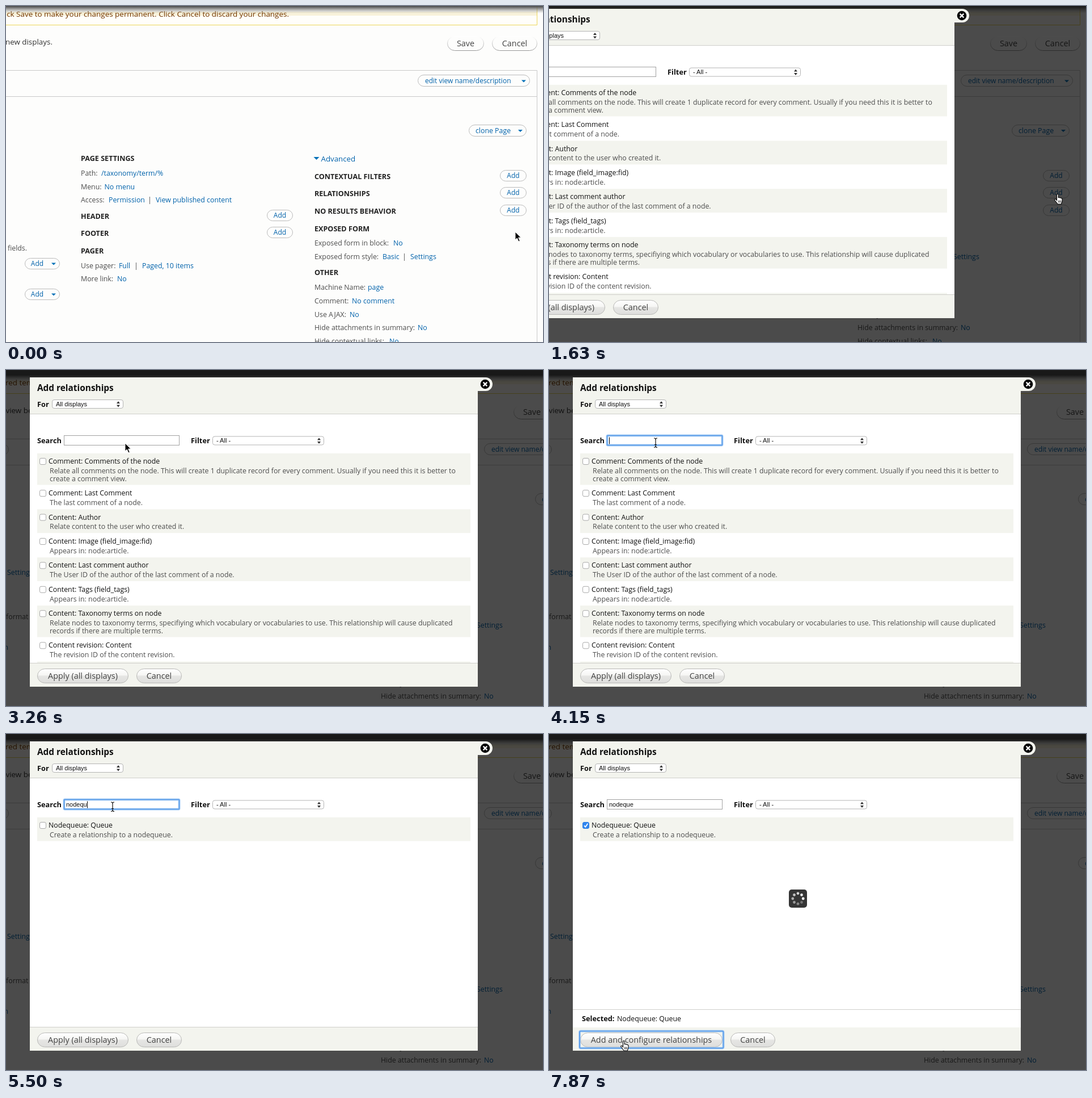
Recreate the animation shown at these times as an HTML page. Size 947x592 px, loop 8 s.

```html
<!DOCTYPE html>
<html lang="en">
<head>
<meta charset="utf-8">
<title>Adding a relationship</title>
<style>
  html, body { margin: 0; width: 100%; height: 100%; overflow: hidden; background: #fdfdfc; }
  svg { display: block; }
  text { font: 12.35px "Open Sans", "Noto Sans", sans-serif; fill: #4d4d4d; }
  .link { fill: #0062ab; }
  .head { font-size: 12.6px; font-weight: 700; fill: #222; }
  .label { font-size: 12.8px; font-weight: 700; fill: #111; }
  .title { font-size: 15.4px; font-weight: 700; fill: #111; }
  .dark { fill: #111; }
  .note { font-size: 13.4px; fill: #333; }
  .warn { font-size: 13.45px; fill: #733600; }
  .small { font-size: 12px; fill: #0062ab; }
  .big { font-size: 14.4px; fill: #444; }
  .form { font: 11px "Liberation Sans", Arial, sans-serif; fill: #111; }
  .mid { text-anchor: middle; }
  .end { text-anchor: end; }
</style>
</head>
<body>
<svg id="stage" width="947" height="592" viewBox="0 0 947 592">
  <defs>
    <linearGradient id="shade" x2="0" y2="1">
      <stop offset="0" stop-color="#444"/><stop offset=".25" stop-color="#666" stop-opacity=".85"/>
      <stop offset="1" stop-color="#999" stop-opacity="0"/>
    </linearGradient>
    <linearGradient id="edge" x2="0" y2="1">
      <stop offset="0" stop-color="#fff"/><stop offset=".5" stop-color="#ccc"/><stop offset="1" stop-color="#999"/>
    </linearGradient>
    <linearGradient id="button" x2="0" y2="1">
      <stop offset="0" stop-color="#fff"/><stop offset=".45" stop-color="#f6f6f4"/>
      <stop offset=".5" stop-color="#e6e6e4"/><stop offset="1" stop-color="#dededc"/>
    </linearGradient>
    <clipPath id="listClip"><rect id="listArea" x="42" y="78" width="790" height="438"/></clipPath>
  </defs>
  <g id="scene">
    <g id="page"></g>
    <rect id="dim" x="-400" y="-40" width="1500" height="680" opacity=".7"/>
    <g id="dialog" transform="translate(-117 -8)">
      <g id="frame"></g>
      <g id="list" clip-path="url(#listClip)"></g>
      <g id="selected"></g>
      <g id="buttons"></g>
      <g id="selectRing"></g>
      <g id="searchRing"></g>
      <text id="query" class="form" x="106" y="128.4"></text>
      <path id="caret" stroke="#000"/>
    </g>
    <g id="spinner"></g>
  </g>
  <g id="recorder"></g>
  <g id="cursor"></g>
</svg>
<script>
const $ = id => document.getElementById(id);
const SIZE = { title: 15.4, big: 14.4, note: 13.4, warn: 13.45, form: 11 };

// y is the middle of the capitals
const text = (x, y, str, cls = '') =>
  `<text x="${x}" y="${y + (SIZE[cls.split(' ')[0]] || 12.4) * .34}" class="${cls}">${str}</text>`;
const rect = (x, y, w, h, fill, more = '') =>
  `<rect x="${x}" y="${y}" width="${w}" height="${h}" fill="${fill}" ${more}/>`;
const line = (d, color) => `<path d="${d}" fill="none" stroke="${color}"/>`;
const arrowDown = (x, y, s = 4) => `<path d="M${x - s} ${y - s / 2}h${2 * s}l${-s} ${s}z" fill="#0071b8"/>`;
const pill = (x, y, w, h, stroke = '#bbb', fill = 'none') =>
  rect(x + .5, y + .5, w - 1, h - 1, fill, `rx="${h / 2}" stroke="${stroke}"`);
const add = (x, y, w = 47) => pill(x, y, w, 20) + text(x + w / 2, y + 10, 'Add', 'small mid');
const dropAdd = y => pill(33, y, 62, 20) + text(55, y + 10, 'Add', 'small mid') + arrowDown(84, y + 10.5);
const bigButton = (x, y, w, label, fill = 'url(#button)', stroke = '#b9b9b7') =>
  pill(x, y, w, 26, stroke, fill) + text(x + w / 2, y + 13, label, 'big mid');
const select = (x, y, w, label) =>
  rect(x + .5, y + .5, w - 1, 15, '#fff', 'rx="3.5" stroke="#b4b4b4"') + text(x + 7, y + 8, label, 'form') +
  `<path d="M${x + w - 12} ${y + 7}l3-4 3 4zm0 2.5l3 4 3-4z" fill="#333"/>`;
const ring = (x, y, w, h, r) =>
  rect(x, y, w, h, 'none', `rx="${r}" stroke="#9cc7f8" stroke-width="4" opacity=".75"`) +
  rect(x, y, w, h, 'none', `rx="${r}" stroke="#5f9fe8" stroke-width="2"`);

// Rows of label and link pairs: y, then x and text by turns
const SETTINGS = [
  [295, 132, 'Path:', 168, '/taxonomy/term/%'],
  [318.5, 132, 'Menu:', 173.5, 'No menu'],
  [342, 132, 'Access:', 181, 'Permission', 250, '|', 264, 'View published content'],
  [457.5, 132, 'Use pager:', 199, 'Full', 226, '|', 240, 'Paged, 10 items'],
  [481, 132, 'More link:', 196, 'No'],
  [418, 544, 'Exposed form in block:', 683, 'No'],
  [441.5, 544, 'Exposed form style:', 664, 'Basic', 699, '|', 713, 'Settings'],
  [496, 544, 'Machine Name:', 638, 'page'],
  [519.5, 544, 'Comment:', 610, 'No comment'],
  [543.5, 544, 'Use AJAX:', 606, 'No'],
  [567, 544, 'Hide attachments in summary:', 726, 'No'],
  [590.5, 544, 'Hide contextual links:', 676, 'No'],
];
const HEADS = [
  [132, 269, 'PAGE SETTINGS'], [132, 371, 'HEADER'], [132, 401, 'FOOTER'], [132, 432, 'PAGER'],
  [544, 300.5, 'CONTEXTUAL FILTERS'], [544, 331, 'RELATIONSHIPS'], [544, 362, 'NO RESULTS BEHAVIOR'],
  [544, 392.5, 'EXPOSED FORM'], [544, 470, 'OTHER'],
];

function settingsRow([y, ...cells]) {
  let out = '';
  for (let i = 0; i < cells.length; i += 2) {
    out += text(cells[i], y, cells[i + 1], i && cells[i + 1] !== '|' ? 'link' : '');
  }
  return out;
}

$('page').innerHTML =
  rect(-400, -40, 1500, 680, '#fdfdfc') +
  rect(-400, 0, 1337, 33, '#fffefa') + rect(-400, 10, 1337, 7, '#f8f2da') +
  line('M-400 33.5H936.5V0', '#edd65a') +
  text(499, 14.5, 'All changes are stored temporarily. Click Save to make your changes permanent. Click Cancel to discard your changes.', 'warn end') +
  rect(-400, -40, 1500, 40, '#555') + rect(-400, 0, 1500, 13, 'url(#shade)') +
  text(82, 63, 'Modify the display(s) of your view below or add new displays.', 'note end') +
  bigButton(778, 53, 65, 'Save', 'none', 'url(#edge)') +
  bigButton(857, 53, 80, 'Cancel', 'none', 'url(#edge)') +
  line('M-400 113.5H936.5V640M-400 159.5H936', '#c9c9c9') +
  pill(726, 121, 198, 21) + text(739, 132, 'edit view name/description', 'small') + arrowDown(913, 132.5) +
  pill(816, 209, 102, 21) + text(859, 219.5, 'clone Page', 'link mid') + arrowDown(907, 220) +
  pill(-160, 122, 48, 20) + text(-115, 349, 'Settings', 'link') + text(-113, 481, 'Description', 'link end') +
  text(37, 427, 'The selected style or row format does not use fields.', 'end') +
  dropAdd(444) + dropAdd(498) +
  arrowDown(547.5, 268.5, 5) +
  `<text x="555.5" y="274" class="link" style="font-size:13.3px">Advanced</text>` +
  HEADS.map(([x, y, s]) => text(x, y, s, 'head')).join('') +
  SETTINGS.map(settingsRow).join('') +
  add(460, 359, 46) + add(460, 389, 46) + add(871, 289) + add(871, 350) +
  add(871, 319) + `<g id="hover">${pill(871, 319, 47, 20, '#888')}</g>`;

$('frame').innerHTML =
  `<path d="M832 13h14a12 12 0 0 1 0 24h-14z" fill="#f3f4ee"/>` +
  `<circle cx="845" cy="25" r="8.3"/><path d="M841.7 21.7l6.6 6.6m0-6.6l-6.6 6.6" stroke="#fff" stroke-width="2.4"/>` +
  rect(42, 13, 790, 545, '#fff') + rect(42, 13, 790, 64, '#f3f4ee') + rect(42, 517, 790, 41, '#f3f4ee') +
  line('M42 77.5H832M42 516.5H832', '#cfcfcb') +
  text(55, 32, 'Add relationships', 'title') +
  text(55, 60.5, 'For', 'label') + select(81, 52, 126, 'All displays') +
  text(55, 124.5, 'Search', 'label') + rect(102.5, 115.5, 203, 17, '#fff', 'stroke="#a2a2a2"') +
  text(326, 124.5, 'Filter', 'label') + select(364, 116.5, 197, '- All -');

$('selected').innerHTML = rect(42, 485, 790, 32, '#fff') + line('M42 485.5H832', '#cfcfcb') +
  text(58, 502, 'Selected:', 'label') + text(120, 502, 'Nodequeue: Queue', 'dark');
$('selectRing').innerHTML = ring(81, 52, 126, 16, 4);
$('searchRing').innerHTML = ring(102.5, 115.5, 203, 17, 1);

const ITEMS = [
  ['Comment: Comments of the node', 'Relate all comments on the node. This will create 1 duplicate record for every comment. Usually if you need this it is better to', 'create a comment view.'],
  ['Comment: Last Comment', 'The last comment of a node.'],
  ['Content: Author', 'Relate content to the user who created it.'],
  ['Content: Image (field_image:fid)', 'Appears in: node:article.'],
  ['Content: Last comment author', 'The User ID of the author of the last comment of a node.'],
  ['Content: Tags (field_tags)', 'Appears in: node:article.'],
  ['Content: Taxonomy terms on node', 'Relate nodes to taxonomy terms, specifiying which vocabulary or vocabularies to use. This relationship will cause duplicated', 'records if there are multiple terms.'],
  ['Content revision: Content', 'The revision ID of the content revision.'],
  ['Content revision: User', 'Relate a node revision to the user who created the revision.'],
  ['Nodequeue: Queue', 'Create a relationship to a nodequeue.'],
];

function listMarkup(query, checked) {
  let y = 146.8;
  return ITEMS.filter(item => item.join(' ').toLowerCase().includes(query)).map((item, i) => {
    const [name, ...about] = item, top = y, h = about.length > 1 ? 56.2 : 42.4;
    y += h;
    return (i % 2 ? '' : rect(55, top, 764, h - .6, '#f3f4ee')) +
      rect(59.5, top + 8.7, 11, 11, checked ? '#2f86f0' : '#fff', `rx="2.5" stroke="${checked ? '#2f7fe0' : '#aaa'}"`) +
      (checked ? `<path d="M62 ${top + 14.5}l2.3 2.5 4-6" fill="none" stroke="#fff" stroke-width="1.7"/>` : '') +
      text(75, top + 14, name, 'dark') + about.map((s, k) => text(77, top + 30.7 + 14 * k, s)).join('');
  }).join('');
}

const buttonsMarkup = pressed => pressed
  ? bigButton(55, 526, 251, 'Add and configure relationships') + bigButton(320, 526, 79, 'Cancel') + ring(54, 523.5, 253.5, 30, 2)
  : bigButton(55, 526, 161, 'Apply (all displays)') + bigButton(230, 526, 80, 'Cancel');

function spinnerMarkup(phase) {
  let out = rect(306, 266, 32, 32, '#353535', 'rx="5"');
  for (let i = 0; i < 8; i++) {
    const a = i * Math.PI / 4, age = (phase - i + 16) % 8;
    out += `<circle cx="${322 + 9.2 * Math.cos(a)}" cy="${282 + 9.2 * Math.sin(a)}" r="2.4" fill="#fff" opacity="${1 - age * .1}"/>`;
  }
  return out;
}

// Edge of the recording window while it is dragged
const recorderMarkup = x =>
  rect(x, 0, 6, 592, '#f0f0f0') + rect(0, 584, x + 6, 8, '#efefef') +
  rect(x - 122.5, 586.5, 69, 20, '#fafafa', 'stroke="#aaa"') + rect(x - 50.5, 586.5, 50, 20, '#fafafa', 'stroke="#aaa"') +
  `<text x="${x - 881}" y="599.5" class="label">AMAMANI</text>`;

const CURSORS = {
  arrow: '<path d="M0 0v14l3.3-3 2.6 6 2.4-1-2.6-5.9h4.6z" fill="#000" stroke="#fff"/>',
  hand: '<path d="M4.5 8V2q0-1.5 1.4-1.5T7.2 2v4.6q2-1 2.6.5 2-.8 2.4.6 1.8-.2 1.8 1.4v3.4L12.4 18H6.2L1 11.3q-.8-1.5.6-2 1.2-.3 2.9 2z" fill="#fff" stroke="#000" stroke-width="1.1"/><path d="M7.3 11.5v4M9.3 11.5v4M11.2 11.5v4" stroke="#000" stroke-width=".8"/>',
  beam: '<path d="M-3-8q3 0 3 2.5Q0-8 3-8M0-6V6.500M-3 8.500q3 0 3-2.500 0 2.500 3 2.500M-2 3.500h4" fill="none" stroke="#111" stroke-width="1.2"/>',
};
const PATH = [
  [0, 898, 398, 'arrow'], [130, 898, 398, 'arrow'], [440, 891, 331, 'hand'], [1780, 891, 331, 'arrow'],
  [2640, 560, -24, 'arrow'], [2990, 440, -24, 'arrow'], [3260, 210, 129, 'arrow'], [3860, 188, 130, 'arrow'],
  [4140, 188, 128, 'beam'], [5800, 188, 128, 'beam'], [6390, 65, 160, 'arrow'], [6600, 65, 160, 'arrow'],
  [7280, 126, 540, 'hand'], [9000, 126, 540, 'hand'],
];
const TYPED = [[0, ''], [4750, 'n'], [4900, 'no'], [5050, 'node'], [5350, 'nodeq'], [5500, 'nodequ'], [5650, 'nodeque']];

const LOOP = 8000, TICK = 148.5;
const OPEN = 1630, PAN = 3110, FOCUS = 4150, CHECK = 6550, PRESS = 7430;

const show = (id, on) => $(id).setAttribute('display', on ? 'inline' : 'none');
const cache = {};
function fill(id, key, make) {
  if (cache[id] === key) return;
  cache[id] = key;
  $(id).innerHTML = make();
}

function moveCursor(t) {
  const i = PATH.findIndex(p => p[0] > t) - 1;
  const [t0, x0, y0, kind] = PATH[i], [t1, x1, y1] = PATH[i + 1];
  const u = (t - t0) / (t1 - t0), e = u * u * (3 - 2 * u);
  fill('cursor', kind, () => CURSORS[kind]);
  $('cursor').setAttribute('transform', `translate(${Math.round(x0 + (x1 - x0) * e)} ${Math.round(y0 + (y1 - y0) * e)})`);
}

function draw(t) {
  const tick = Math.floor(t / TICK + .12);
  const open = t >= OPEN, checked = t >= CHECK, pressed = t >= PRESS;
  const typed = TYPED.filter(k => k[0] <= t).pop()[1];

  $('scene').setAttribute('transform', t >= PAN ? 'translate(117 8)' : '');
  show('hover', t >= 440 && !open);
  show('dim', open);
  show('dialog', open);

  fill('list', typed + checked, () => listMarkup(typed, checked));
  $('listArea').setAttribute('height', checked ? 407 : 438);
  show('selected', checked);
  fill('buttons', pressed, () => buttonsMarkup(pressed));
  show('selectRing', t >= 3710 && t < FOCUS);
  const typing = t >= FOCUS && !checked;
  show('searchRing', typing);
  show('caret', typing);
  if ($('query').textContent !== typed) $('query').textContent = typed;
  const caretX = 106 + (typed ? $('query').getComputedTextLength() + .5 : 0);
  $('caret').setAttribute('d', `M${Math.round(caretX) + .5} 118.5v12`);

  const busy = (t >= 1040 && !open) || t >= 7580;
  show('spinner', busy);
  const phase = open ? (tick - 53 + 16) % 8 : t >= 1330 ? 0 : 6;
  fill('spinner', phase, () => spinnerMarkup(phase));

  const dragging = t >= 2810 && t < PAN;
  show('recorder', dragging);
  const edge = t >= 2960 ? 830 : 883;
  fill('recorder', edge, () => recorderMarkup(edge));
  moveCursor(tick * TICK);
}

const start = performance.now();
function frame() {
  draw((performance.now() - start) % LOOP);
  requestAnimationFrame(frame);
}
frame();
</script>
</body>
</html>
```
